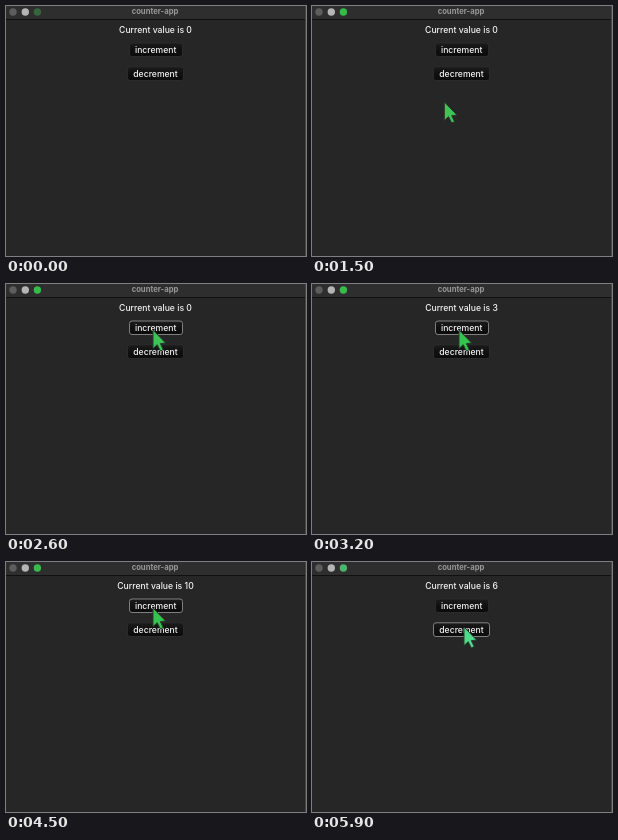
Animation of 300x250 px, one loop 6000 ms. Source, as an HTML page:

```html
<!DOCTYPE html>
<html lang="en">
<head>
<meta charset="utf-8">
<title>counter-app</title>
<style>
  html, body { margin: 0; width: 100%; height: 100%; overflow: hidden; background: #262626; }
  svg { display: block; width: 300px; height: 250px; }
  text { font: 530 8.65px Inter, sans-serif; fill: #f4f4f4; text-anchor: middle; }
  .title { font-size: 7.7px; font-weight: 700; fill: #979797; }
</style>
</head>
<body>
<svg viewBox="0 0 300 250">
  <defs>
    <linearGradient id="face" x2="0" y2="1">
      <stop offset="0" stop-color="#1c1c1c"/>
      <stop offset=".5" stop-color="#101010"/>
      <stop offset="1" stop-color="#0b0b0b"/>
    </linearGradient>
  </defs>
  <rect width="300" height="250" fill="#262626"/>
  <rect width="300" height="13" fill="#2e2e2e"/>
  <rect y="13" width="300" height="1" fill="#101010"/>
  <rect x="299" width="1" height="250" fill="#454545"/>
  <circle cx="7" cy="6" r="3.7" fill="#5e5d5d"/>
  <circle cx="19.3" cy="6" r="3.7" fill="#b5b5b5"/>
  <circle id="zoom" cx="31.4" cy="6" r="3.7"/>
  <text class="title" x="149" y="8.4">counter-app</text>
  <text id="value" x="149.5" y="26.6"></text>
  <rect id="inc" x="123.5" y="37" width="53" height="13.5" rx="2.5" fill="url(#face)"/>
  <text x="149.7" y="47.2">increment</text>
  <rect id="dec" x="121.5" y="60.8" width="56" height="13.7" rx="2.5" fill="url(#face)"/>
  <text x="149.5" y="71.2">decrement</text>
  <path id="pointer" d="M0 0V18.5L4.2 14.7L7.4 21L10.2 19.6L7.4 13.6L12.6 13Z"
        stroke="#28392d" stroke-width="1" stroke-linejoin="round"/>
</svg>
<script>
  const LOOP = 6000, STEP = 100;
  const $ = id => document.getElementById(id);

  // time, x, y of the pointer tip
  const path = [
    [400, 109, 212], [500, 110, 211], [800, 110, 210], [1100, 110, 201],
    [1400, 127, 113], [1700, 143, 62], [1900, 147, 46],
    [4800, 147, 46], [5000, 152, 65], [6000, 152, 65]
  ];

  // time, pointer colour, zoom light colour
  const tints = [
    [0, '#27e33c', '#34663b'], [400, '#27e33c', '#2fb843'],
    [1500, '#3cc457', '#30bd48'], [3000, '#35c44f', '#35bd4c'],
    [4900, '#49e37d', '#46c267'], [5600, '#50db8b', '#4bb56b']
  ];

  function pointerAt(t) {
    const i = path.findIndex(p => p[0] > t);
    const [t0, x0, y0] = path[i - 1], [t1, x1, y1] = path[i];
    const k = (t - t0) / (t1 - t0);
    return [x0 + (x1 - x0) * k, y0 + (y1 - y0) * k];
  }

  // clicks made so far at a steady 200 ms pace
  const clicks = (t, start, max) =>
    Math.max(0, Math.min(max, Math.floor((t - start) / 200) + 1));

  function draw(time) {
    const t = Math.floor(time % LOOP / STEP) * STEP;
    const [, tint, light] = tints.filter(c => c[0] <= t).pop();
    const border = on => on ? '#808080' : '#2b2b2b';

    $('value').textContent =
      'Current value is ' + (clicks(t, 2700, 10) - clicks(t, 5200, 4));
    $('zoom').setAttribute('fill', light);
    $('inc').setAttribute('stroke', border(t >= 1800 && t < 4900));
    $('dec').setAttribute('stroke', border(t >= 4900));

    const pointer = $('pointer'), shown = t >= path[0][0];
    pointer.setAttribute('visibility', shown ? 'visible' : 'hidden');
    if (shown) {
      pointer.setAttribute('fill', tint);
      pointer.setAttribute('transform', `translate(${pointerAt(t)})`);
    }
  }

  const begin = performance.now();
  function tick() {
    draw(performance.now() - begin);
    requestAnimationFrame(tick);
  }
  tick();
</script>
</body>
</html>
```
